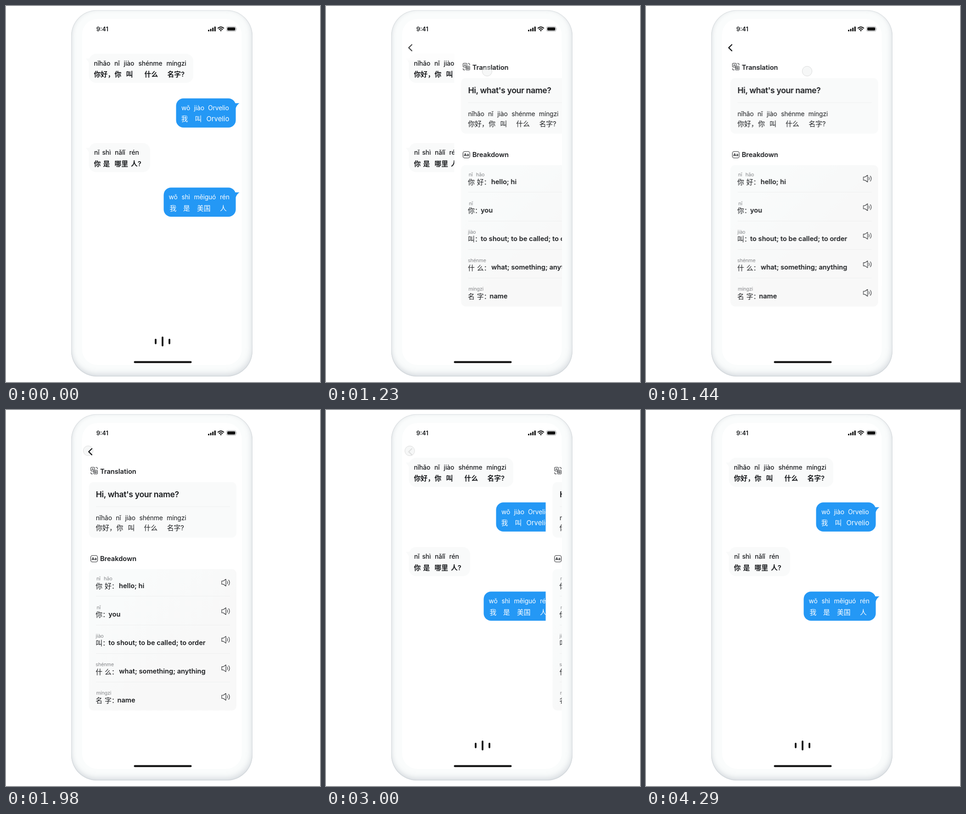
Write an HTML page that moves like this. It is 684x819 px and loops after 4320 ms.

```html
<!DOCTYPE html>
<html lang="zh-CN">
<head>
<meta charset="utf-8">
<title>Chat phrase lookup</title>
<style>
html, body { margin: 0; width: 100%; height: 100%; overflow: hidden; background: #fff; }
#phone {
  position: absolute; left: 142px; top: 9px; width: 395px; height: 798px; border-radius: 56px;
  background: #fafcfc;
  box-shadow:
    inset 0 0 2px rgba(115, 124, 133, .42),
    inset -2px -6px 13px rgba(145, 156, 168, .3),
    inset 3px 0 9px rgba(155, 166, 176, .12);
}
svg { position: absolute; left: 0; top: 0; }
text { font-family: Inter, "Noto Sans CJK SC", "Noto Sans CJK", sans-serif; fill: #191b1e; white-space: pre; }
.pin { font-size: 13.8px; letter-spacing: -.1px; }
.han { font-size: 14.8px; }
.pin.bold { font-weight: 500; }
.han.bold { font-weight: 600; }
.blue { fill: #fff; }
.mini { font-size: 10.8px; letter-spacing: -.15px; fill: #85878a; }
.word { font-size: 14.6px; font-weight: 600; }
.title { font-size: 17.6px; font-weight: 600; letter-spacing: -.36px; }
.line { fill: none; stroke: #232528; stroke-width: 1.1; stroke-linecap: round; stroke-linejoin: round; }
.rule { stroke: #eff0f0; }

#panel, #back, #head, #touch, #touchDot { animation: 4320ms infinite linear; }
#panel { animation-name: slide; }
#back { animation-name: show; }
#head { animation-name: cover; }
#touch { animation-name: travel; }
#touchDot { animation-name: touch; }

@keyframes slide {
  0% { transform: translateX(348px); }
  23.01% { transform: translateX(348px); animation-timing-function: cubic-bezier(0, 0, .58, 1); }
  34.22%  { transform: translateX(0); }
  66.04% { transform: translateX(0); animation-timing-function: cubic-bezier(0, 0, .58, 1); }
  70.67%, 100% { transform: translateX(348px); }
}
@keyframes show {
  0%, 23.01% { opacity: 0; }
  30.1% { opacity: 1; }
  66.04% { opacity: 1; animation-timing-function: cubic-bezier(0, 0, .58, 1); }
  70.67%, 100% { opacity: 0; }
}
@keyframes cover {
  0%, 23.01% { opacity: 0; }
  30.1%, 66.03% { opacity: 1; }
  66.04%, 100% { opacity: 0; }
}
@keyframes travel {
  0% { transform: translate(351px, 142px); }
  34.49% { transform: translate(351px, 142px); animation-timing-function: cubic-bezier(.22, .1, .3, 1); }
  45.83% { transform: translate(179px, 88.8px); animation-timing-function: ease-in-out; }
  62.5%, 100% { transform: translate(182.4px, 89px); }
}
@keyframes touch {
  0%, 10.417% { opacity: 0; }
  22.22%, 70.14% { opacity: 1; }
  77.78%, 100% { opacity: 0; }
}
</style>
</head>
<body>
<div id="phone"></div>
<script>
const text = (cls, x, y, s) => `<text class="${cls}" x="${x}" y="${y}">${s}</text>`;
// Each word is written as "x:word", separated by spaces.
const words = (cls, y, list) => list.split(' ').map(w => {
  const [x, s] = w.split(':');
  return text(cls, x, y, s);
}).join('');
const box = (x, y, w, h, r, fill) =>
  `<rect x="${x}" y="${y}" width="${w}" height="${h}" rx="${r}" fill="${fill}"/>`;
const rule = y => `<path class="rule" d="M196 ${y}H488"/>`;
const line = (d, extra = '') => `<path class="line" d="${d}" ${extra}/>`;

function bubble(left, right, y, mine, pinyin, hanzi) {
  const fill = mine ? '#2498f5' : '#f9fafa';
  const tail = mine
    ? `M499 ${y + 10.5}H508.5Q503 ${y + 14} 500.5 ${y + 21}H497Z`
    : `M182 ${y + 10.5}H173.5Q178 ${y + 14} 180.5 ${y + 20}H184Z`;
  const tone = mine ? 'blue' : 'bold';
  return box(left, y, right - left, 63.5, 16, fill) + `<path d="${tail}" fill="${fill}"/>` +
    words('pin ' + tone, y + 25.5, pinyin) + words('han ' + tone, y + 50, hanzi);
}

const speaker = y => `<g transform="translate(469 ${y})">` +
  line('M1 -3.5H4.5L10 -7.5V7.5L4.5 3.5H1Z') +
  line('M13 -2.8Q14.6 0 13 2.8M16 -5.6Q20 0 16 5.6') + '</g>';

const entry = (i, pinyin, hanzi, x, meaning) => {
  const y = 376 + i * 62.2;
  return words('mini', y - 4.7, pinyin) + words('han', y + 13, hanzi) +
    text('word', x, y + 11.7, meaning) + speaker(y) + (i < 4 ? rule(Math.round(y + 29.4) + .5) : '');
};

const chat =
  bubble(180.5, 408, 104, false,
    '191.5:nǐhǎo 236:nǐ 256.5:jiào 288.5:shénme 349.5:míngzi',
    '191.5:你好， 236.5:你 261.5:叫 301.5:什么 351.5:名字?') +
  bubble(370.5, 500.5, 201.3, true,
    '382:wǒ 409.5:jiào 440:Orvelio', '381.5:我 411.5:叫 436.5:Orvelio') +
  bubble(180.5, 314, 298.5, false,
    '192:nǐ 209.5:shì 237:nǎlǐ 268.5:rén', '191.5:你 211.5:是 236.5:哪里 272:人?') +
  bubble(343.5, 500.5, 395.5, true,
    '354.5:wǒ 382.5:shì 409.5:měiguó 466:rén', '356.5:我 386:是 416:美国 466:人') +
  [[326, 12], [341, 21.5], [356, 12]].map(([x, h]) =>
    box(x - 1.9, 730.7 - h / 2, 3.8, h, 1.9, '#111')).join('');

const translateIcon =
  line('M192 133H186.2Q184.8 133 184.8 131.6V126.2Q184.8 124.8 186.2 124.8H191.6Q193 124.8 193 126.2V130') +
  line('M192.6 131.2H197.8Q199.2 131.2 199.2 132.6V137.9Q199.2 139.3 197.8 139.3H192.6Q191.2 139.3 191.2 137.9V132.6Q191.2 131.2 192.6 131.2Z') +
  line('M187 130.8L188.9 126.8L190.8 130.8M187.7 129.5H190.1M193.2 134H197.2V136.4H193.2ZM195.2 132.8V137.8', 'style="stroke-width:.8"') +
  line('M195.6 125H197Q199 125 199 127V128.4M188.6 139.3H187Q185 139.3 185 137.3V136');

const detail = box(165.5, 100, 349, 666, 0, '#fff') +
  translateIcon + text('word', 205, 138.5, 'Translation') +
  box(180.5, 157, 321.5, 121, 10, '#f9fafa') +
  text('title', 195.7, 190, 'Hi, what\'s your name?') + rule(210.5) +
  words('pin', 240, '195.7:nǐhǎo 239.3:nǐ 259.5:jiào 290.5:shénme 350:míngzi') +
  words('han', 261.5, '195.5:你好， 240.5:你 265.5:叫 300.5:什么 350.7:名字?') +
  '<rect class="line" x="184.6" y="317" width="14.8" height="14" rx="3.6"/>' +
  '<text x="186.6" y="327.2" font-size="8.2" font-weight="700">Aa</text>' +
  text('word', 205, 328.5, 'Breakdown') +
  box(180.5, 346.5, 321.5, 308, 10, 'url(#card)') +
  entry(0, '197:nǐ 213:hǎo', '195.3:你 215:好：', 246, 'hello; hi') +
  entry(1, '197.5:nǐ', '195.3:你：', 223.3, 'you') +
  entry(2, '195.5:jiào', '195.3:叫：', 223.3, 'to shout; to be called; to order') +
  entry(3, '195.2:shénme', '195.3:什 215:么：', 246.3, 'what; something; anything') +
  entry(4, '196.5:míngzi', '195.3:名 215:字：', 242.5, 'name');

const status = '<text x="196.8" y="55.4" font-size="13" font-weight="600">9:41</text>' +
  [3.5, 5.5, 8, 10.5].map((h, i) => box(440 + i * 4.6, 55.2 - h, 3, h, .9, '#111')).join('') +
  '<g fill="none" stroke="#111" stroke-width="2">' +
  '<path d="M461.2 48.8Q468 42.4 474.8 48.8M463.8 51.4Q468 47.6 472.2 51.4"/></g>' +
  '<path d="M465.7 53.1Q468 51.4 470.3 53.1L468 55.5Z" fill="#111"/>' +
  '<rect x="480.3" y="44.8" width="20.8" height="10.4" rx="3.2" fill="none" stroke="#a3a5a8"/>' +
  box(482, 46.5, 17.4, 7, 1.8, '#111') +
  '<path d="M502.2 48.3Q503.8 50 502.2 51.8Z" fill="#a3a5a8"/>';

document.body.insertAdjacentHTML('beforeend', `
<svg width="684" height="819" viewBox="0 0 684 819">
  <defs>
    <clipPath id="screen"><rect x="165.5" y="28" width="348" height="754" rx="34"/></clipPath>
    <linearGradient id="card" x1="0" y1="0" x2="1" y2="1">
      <stop offset=".2" stop-color="#f9fbfb"/><stop offset=".6" stop-color="#f8f8f8"/>
    </linearGradient>
  </defs>
  <g clip-path="url(#screen)">
    ${box(165.5, 28, 348, 754, 34, '#fff')}
    ${chat}
    <g id="head">${box(165.5, 62, 348, 56.5, 0, '#fff')}</g>
    <g id="panel">${detail}</g>
    ${status}
    ${box(278.5, 773.5, 126, 4.3, 2.15, '#111')}
    <g id="touch"><circle id="touchDot" r="10.7" fill="rgba(236,237,237,.45)" stroke="rgba(0,0,0,.12)"/></g>
    <path id="back" d="M187 84.2L180.2 90.9L187 97.6" fill="none" stroke="#17181a" stroke-width="2.2" stroke-linecap="round" stroke-linejoin="round"/>
  </g>
</svg>`);
</script>
</body>
</html>
```
